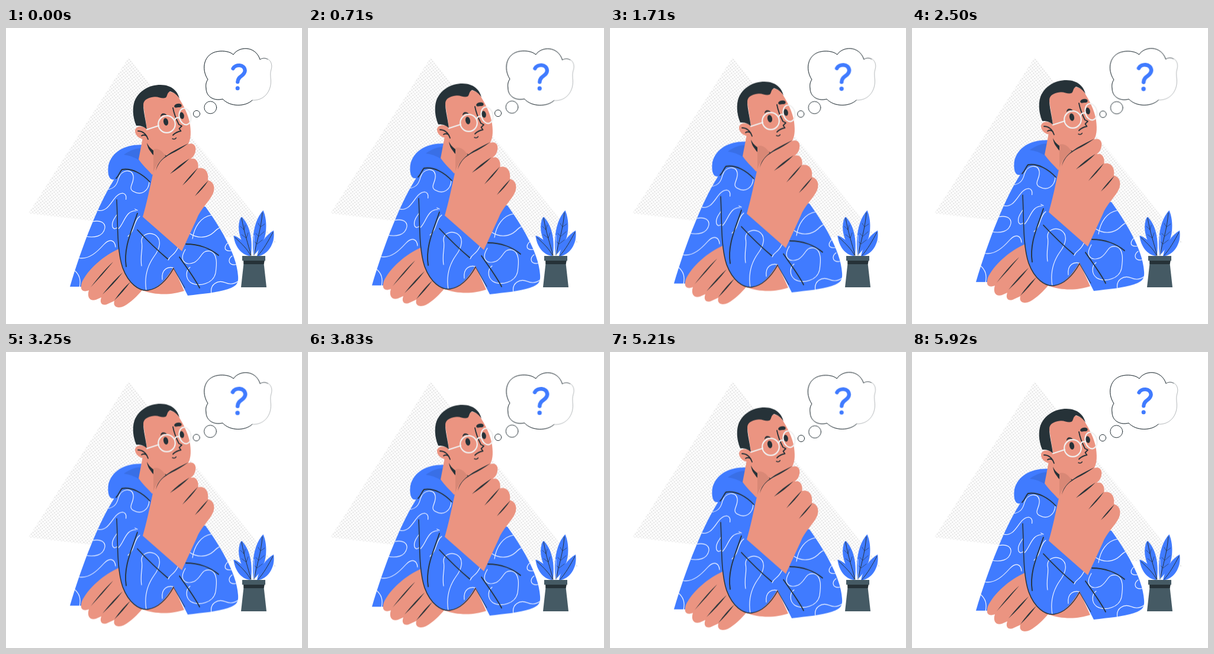
These frames come from a looping animation (500 px wide and 500 px high, 5.96 s). An HTML page:

```html
<!DOCTYPE html>
<html lang="en">
<head>
<meta charset="utf-8">
<title>Thinking man</title>
<style>
html, body { margin: 0; width: 100%; height: 100%; overflow: hidden; background: #fff; }
svg { display: block; width: 100vw; height: 100vh; }
.blue { fill: #407bff; }
.skin { fill: #eb9481; }
.dark { fill: #263238; }
.line { fill: none; stroke: #263238; stroke-width: 1.8; stroke-linecap: round; stroke-linejoin: round; }
.thin { stroke-width: 1; }
.swirl { fill: none; stroke: #fff; stroke-width: 1.1; stroke-linecap: round; }
.glass { fill: none; stroke: #f0f0f0; stroke-width: 2.2; stroke-linecap: round; }
.man { animation: float 5.96s linear infinite; }
.bubble { transform-origin: 383px 90px; animation: wind 2.98s linear infinite; }
.mark { transform-origin: 393px 82px; animation: pulse 5.96s linear infinite; }
@keyframes float { 50% { transform: translateY(-9.4px); } }
@keyframes wind { 25% { transform: rotate(1deg); } 75% { transform: rotate(-1deg); } }
@keyframes pulse { 50% { transform: scale(1.06); } }
</style>
</head>
<body>
<svg viewBox="0 0 500 500">
  <defs>
    <pattern id="dots" width="5.8" height="5.8" patternUnits="userSpaceOnUse" patternTransform="rotate(7)">
      <circle cx="1.45" cy="1.45" r="1.25" fill="#e0e0e0"/>
      <circle cx="4.35" cy="4.35" r="1.25" fill="#e0e0e0"/>
    </pattern>
    <path id="torso" d="M188 248C158 290 128 370 108 437H128L191 373 283 405 307 452C332 449 357 447 375 441C389 436 393 432 392 419C390 380 357 330 337 302L290 290 246 247 196 239Z"/>
    <path id="sleeve" d="M187 290C189 330 187 375 197 405C207 432 225 445 240 443C260 440 276 420 298 376L231 319 222 312 205 290Z"/>
    <clipPath id="inTorso"><use href="#torso"/></clipPath>
    <clipPath id="inSleeve"><use href="#sleeve"/></clipPath>
  </defs>

  <path d="M207 50L457 363 38 313Z" fill="url(#dots)"/>

  <!-- plant -->
  <g>
    <g class="blue">
      <path d="M414 384C400 370 390 345 394 328Q395 321 398 319C408 328 418 350 414 384Z"/>
      <path d="M418 384C414 350 421 322 434.500 308C442 325 444 362 418 384Z"/>
      <path d="M413 385C397 384 386 368 384.500 350.500C398 355 410 368 413 385Z"/>
      <path d="M424 385C428 364 439 350 452 342C455 360 446 380 428 385Z"/>
    </g>
    <g class="line thin">
      <path d="M398 321C402 345 409 365 414 384M433 312C431 340 423 362 419 384M387 354C398 364 408 374 413 384M451 345C443 360 435 374 426 384"/>
      <path stroke-width=".6" d="M396 335L402 341 404 333M398 349L406 355 409 346M426 330L430 336 437 331M422 347L427 352 436 344M420 361L424 365 433 358"/>
    </g>
    <path d="M416 350V385M419 350V385" fill="none" stroke="#fff" stroke-width=".7"/>
    <path d="M402 393H435L440 438H397Z" fill="#455a64"/>
    <path class="dark" d="M401 392H437L435.500 399H401.500Z"/>
    <path d="M399 385H438V393H399Z" fill="#455a64"/>
  </g>

  <!-- thought bubble -->
  <g class="bubble">
    <path d="M341 87C329 69 334 43 358 39.500C368 38 379 40 384 45C393 31 421 29 429 53C441 46 452 57 448 70C446 76 447 80 447 84C450 104 438 123 416 122C405 133 379 134 366 120C350 124 338 115 338 102C337 96 338 91 341 87Z" fill="#fff" stroke="#263238" stroke-width=".35"/>
    <path class="line thin" d="M416 122C405 133 379 134 366 120C350 124 338 115 338 102C337 96 338 91 341 87C329 69 334 43 358 39.500C368 38 379 40 384 45C393 31 421 29 429 53"/>
    <path class="line" stroke-width=".6" style="stroke-width:.6" d="M429 53Q436 49 442 53"/>
    <circle class="line thin" cx="345.300" cy="134.300" r="10.400"/>
    <circle class="line thin" cx="322" cy="145" r="5.600"/>
  </g>
  <g class="mark">
    <path d="M383.500 68.500C387 61 403 60.500 403.700 72C403 82 392 80 391.300 91" fill="none" stroke="#407bff" stroke-width="6.300" stroke-linecap="round" stroke-linejoin="round"/>
    <circle class="blue" cx="391.200" cy="101.800" r="3.500"/>
  </g>

  <g class="man">
    <!-- hood -->
    <path class="blue" d="M232 197.500C203 196 179 208 173 232C171 246 174 256 180 256H200L246 262 250 240Z"/>
    <path d="M199 214C210 206 220 203 231 203L225 223C216 218 208 215 199 214Z" fill="#396fe6"/>

    <!-- torso and sleeves -->
    <use href="#torso" class="blue"/>
    <g class="swirl" clip-path="url(#inTorso)">
      <path d="M170 273C184 272 188 263 190 254C195 239 213 237 215 250C217 262 205 270 215 276C229 284 241 275 242 260"/>
      <path d="M155 308C176 313 180 280 197 279C207 281 203 295 195 305C188 315 177 326 180 336C184 346 197 330 203 315C207 306 213 303 222 308"/>
      <path d="M146 327C160 324 168 329 167 338C164 352 150 355 134 352"/>
      <path d="M121 388C140 393 156 376 165 366C175 355 184 358 185 370"/>
      <path d="M115 409C124 416 127 426 124 438"/>
      <path d="M315 356C318 336 329 319 347 316"/>
      <path d="M310 347C325 357 341 354 351 345C358 338 364 334 370 338"/>
      <path d="M303 374C291 394 304 402 318 396C331 389 330 374 345 377C358 381 356 400 354 414C350 432 326 438 312 430C302 422 304 409 311 404"/>
      <path d="M347 448C344 433 358 425 370 430C379 434 387 432 393 427"/>
      <path d="M380 359C366 368 367 379 382 376M391 399C376 403 373 391 382 385"/>
    </g>
    <path class="skin" d="M230 443C253 452 281 451 301 444L283 404Z"/>
    <path class="skin" d="M191 373C165 384 138 408 128 430C124 443 130 447 140 443C136 456 143 462 152 459L161 455C157 466 164 470 172 466L183 461C180 472 190 474 199 470C212 463 222 452 230 443L198 405Z"/>
    <g class="dark">
      <path d="M181 395Q165 409 143 438Q163 417 181 395Z"/>
      <path d="M197 413Q182 426 163 450Q182 433 197 413Z"/>
      <path d="M210 429Q197 440 183 460Q198 446 210 429Z"/>
    </g>
    <use href="#sleeve" class="blue"/>
    <g class="swirl" clip-path="url(#inSleeve)">
      <path d="M190 339C200 330 202 306 222 309M206 352C219 341 215 326 226 318"/>
      <path d="M229 402C226 383 232 373 229 361C228 350 240 344 251 349C265 357 259 374 250 386C240 400 233 420 237 444"/>
      <path d="M264 425C262 408 273 401 286 406"/>
      <path d="M291 370C283 387 278 382 274 392"/>
    </g>
    <g class="line">
      <path stroke-width="1.500" d="M187 290C189 330 187 375 197 405C207 432 225 445 240 443C260 440 274 422 283 406"/>
      <path d="M222 313C212 343 198 372 203 403"/>
      <path d="M222 341Q248 369 273 390"/>
      <path d="M293 387C303 402 317 420 327 439"/>
      <path d="M304 365C325 365 345 372 359 384"/>
      <path d="M186 254C191 249 192 243 196 239C213 236 231 247 243 260"/>
      <path stroke-width="1" class="thin" d="M283 406L302 439"/>
    </g>

    <!-- head -->
    <path class="skin" d="M232 180L224 222C231 232 239 239 247 248L275 222 270 190Z"/>
    <path class="skin" d="M231 125C238 108 284 98 292 118C299 130 308 145 311 164C313 180 312 190 306 199L270 216C256 208 247 200 240 188C229 190 218 183 218 174C218 166 229 164 238 170Z"/>
    <path class="dark" d="M238 171C230 164 223 165 220 165C213 148 214 133 217 124C224 106 242 96 261 96C280 96 290 107 293 119C288 112 284 109 277 107C271 110 273 117 269 118C262 120 256 114 246 117C238 119 232 122 232 130C232 141 236 156 238 171Z"/>
    <path class="dark" d="M238 194C242 203 252 212 270 215L273 218C263 222 250 219 245 210Q239 203 238 194Z"/>
    <path d="M249 205C258 202 265 209 270 217C260 223 253 234 249 248Z" fill="#d98876"/>
    <path class="line" d="M223 174C231 174 237 180 240 188M229 182Q234 179 238 183"/>
    <g class="dark">
      <path d="M284 132C286 127 293 127 296 129C298 133 295 134 292 134C288 134 285 136 284 132Z"/>
      <path d="M261 150C261 142 270 143 273 149C269 146 265 146 261 150Z"/>
      <ellipse cx="270" cy="158.500" rx="4" ry="6.300" transform="rotate(-12 270 158.500)"/>
      <ellipse cx="297" cy="148" rx="3.800" ry="5.800" transform="rotate(-12 297 148)"/>
    </g>
    <path class="line" d="M282 135C284 146 288 155 292 163L297 165.500 292.500 170 295.500 174C290 175 286 177 282 181"/>
    <path class="line" style="stroke-width:1.400" d="M281 187Q285 189 287.500 185.500"/>
    <g class="glass">
      <circle cx="271.500" cy="162.500" r="14.300"/>
      <ellipse cx="302.500" cy="149.500" rx="9.800" ry="14" transform="rotate(-14 302.500 149.500)"/>
      <path d="M285 155Q288 150 293 152M238 171.500L258 165"/>
    </g>

    <!-- fist -->
    <path class="skin" d="M248 247C251 236 257 225 268 219C283 210 296 201 308 196C317 193 322 200 320 208C319 214 316 218 312 221C321 218 326 227 324.500 237C337 234 343 245 341 257C350 259 354 268 350 279C344 293 328 306 322 323L297 377 231 319C237 299 243 270 248 247Z"/>
    <path class="dark" d="M253 241C256 226 266 219 279 210Q295 201 308 195Q291 207 280 212C266 219 258 226 253 241Z"/>
    <g class="dark">
      <path d="M277 246.500Q291 232 310 220.500Q295 236 277 246.500Z"/>
      <path d="M298 266Q309 251 324 236.500Q313 253 298 266Z"/>
      <path d="M319 284Q329 270 342 257.500Q332 273 319 284Z"/>
    </g>
  </g>
</svg>
</body>
</html>
```
